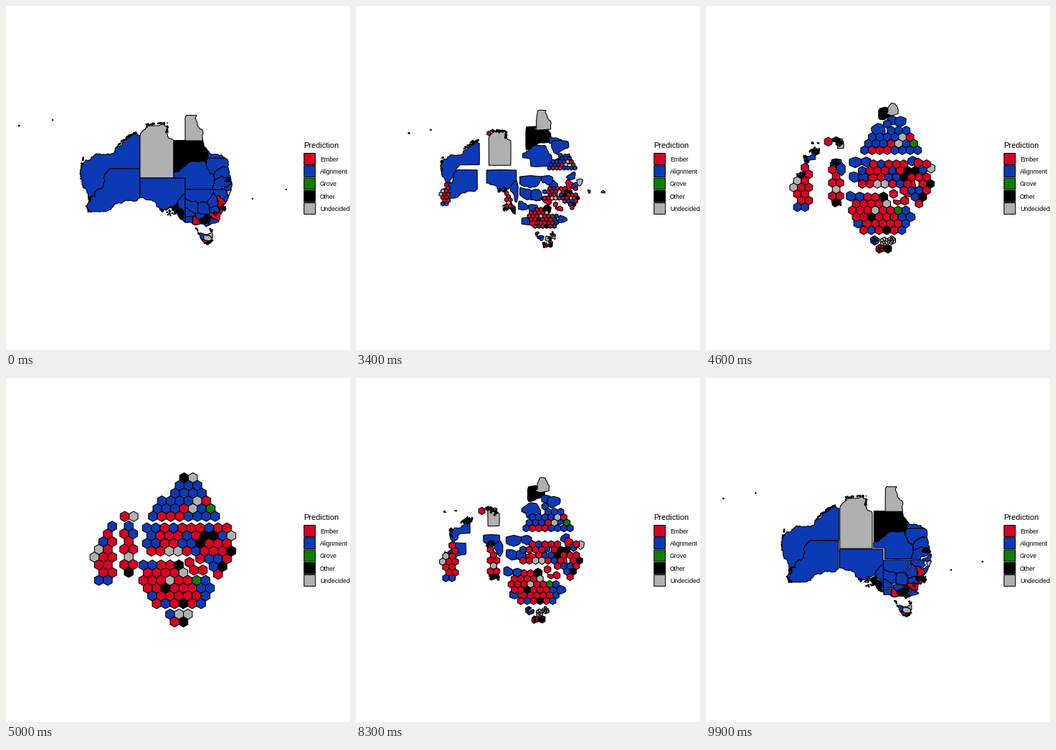
Animation, 480 px wide and 480 px high, one loop 10 s. Source, as a matplotlib script:

```python
import numpy as np
import matplotlib.pyplot as plt
from matplotlib.animation import FuncAnimation
from matplotlib.collections import PolyCollection
from matplotlib.patches import Rectangle

SIZE, DPI = 480, 80
PX = 72 / DPI
FRAMES, STEP = 100, 100
DX, DY, R = 12.4, 10.75, 7.16
LINE, KEY = 1.07, 17.28

COLOURS = {"R": "#da0025", "B": "#0c3ab4", "G": "#127d00",
           "K": "#000000", "U": "#b0b0b0"}
LABELS = ["Ember", "Alignment", "Grove", "Other", "Undecided"]

rng = np.random.default_rng(7)


def hexagon(x, y, r):
    a = np.pi / 6 + np.arange(6) * np.pi / 3
    return np.column_stack([x + r * np.cos(a), y + r * np.sin(a)])


def half(p, d, level):
    """The part of polygon p where p.d <= level."""
    out = []
    for a, b in zip(p, np.roll(p, -1, 0)):
        u, v = a @ d - level, b @ d - level
        if u <= 0:
            out.append(a)
        if u * v < 0:
            out.append(a + (b - a) * u / (u - v))
    return np.array(out)


def cell(outline, seeds, i):
    """The part of the outline that lies nearest to seed i."""
    for j, s in enumerate(seeds):
        if j != i:
            d = s - seeds[i]
            outline = half(outline, d, d @ (s + seeds[i]) / 2)
    return np.round(outline, 1)


def ragged(a, b):
    """Coast-like line from a to b; the same whichever way it is walked."""
    if np.abs(a - b).min() < 0.05:
        return [a]
    lo, hi = sorted([tuple(a), tuple(b)])
    dice = np.random.default_rng([round(v * 10) for v in lo + hi])
    line = [np.array(lo), np.array(hi)]
    while np.hypot(*(line[1] - line[0])) > 1.8:
        finer = []
        for p, q in zip(line, line[1:]):
            d = q - p
            finer += [p, (p + q) / 2 + np.array([-d[1], d[0]])
                      * dice.uniform(-0.2, 0.2)]
        line = finer + [line[-1]]
    return line[:-1] if tuple(a) == lo else line[:0:-1]


def coast(p):
    return np.array([q for a, b in zip(p, np.roll(p, -1, 0))
                     for q in ragged(a, b)])


def area(p):
    q = np.roll(p, -1, 0)
    return np.sum(p[:, 0] * q[:, 1] - q[:, 0] * p[:, 1]) / 2


def lengths(p):
    s = np.hypot(*np.diff(np.vstack([p, p[:1]]), axis=0).T).cumsum()
    return np.concatenate([[0], s / s[-1]])


def along(p, f):
    s, q = lengths(p), np.vstack([p, p[:1]])
    return np.column_stack([np.interp(f % 1, s, q[:, k]) for k in (0, 1)])


def match(a, b):
    """Give both rings the same number of points, starts aligned."""
    a, b = [p if area(p) > 0 else p[::-1] for p in (a, b)]
    f = np.linspace(0, 1, 48, endpoint=False)
    ring, other = [along(p, f) - along(p, f).mean(0) for p in (a, b)]
    k = np.argmin([np.sum((ring - np.roll(other, -i, 0)) ** 2)
                   for i in range(48)])
    cuts = np.sort(np.concatenate([lengths(a)[:-1],
                                   (lengths(b)[:-1] - f[k]) % 1]))
    return along(a, cuts), along(b, cuts + f[k])


def shatter(p, n):
    """Cut a convex polygon into n pieces of about equal area."""
    if n == 1:
        return [p]
    angles = rng.uniform(0, np.pi) + np.arange(6) * np.pi / 6
    dirs = np.column_stack([np.cos(angles), np.sin(angles)])
    d = dirs[np.argmax(np.ptp(p @ dirs.T, axis=0))]
    k, s = n // 2, p @ d
    level = s.min() + np.ptp(s) * k / n
    return shatter(half(p, d, level), k) + shatter(half(p, -d, -level), n - k)


def islets(n, path):
    path = np.array(path, float)
    for _ in range(n):
        i = rng.integers(max(len(path) - 1, 1))
        a, b = path[i], path[min(i + 1, len(path) - 1)]
        x, y = a + (b - a) * rng.random()
        drift = rng.normal(0, 0.7, 2) if len(path) > 1 else 0
        yield hexagon(x, y, rng.uniform(0.4, 1)) + drift


tiles, rural, urban = [], [], []


def region(left, top, art, outline=(), seeds=(), isles=(), city=(0, 0),
           spread=0.08):
    """One character per seat, half a tile per column; a lower-case seat
    takes the land around the next seed, the others crowd the city."""
    seats = [(left + c * DX / 2, top + r * DY, k)
             for r, row in enumerate(art)
             for c, k in enumerate(row) if k != " "]
    outline, seeds = np.array(outline, float), np.array(seeds, float)
    mid = np.mean([s[:2] for s in seats], axis=0)
    n = 0
    for x, y, k in seats:
        tile, colour = hexagon(x, y, R), COLOURS[k.upper()]
        tiles.append((tile, colour))
        if k.islower():
            group, parts = rural, [coast(cell(outline, seeds, n))]
            for owner, count, path in isles:
                if owner == n:
                    parts += islets(count, path)
            n += 1
        else:
            spot = city + spread * (np.array([x, y]) - mid)
            group, parts = urban, [hexagon(*spot, 0.8)]
        pieces = shatter(tile, len(parts))
        for part in parts:
            gaps = [np.hypot(*(q.mean(0) - part.mean(0))) for q in pieces]
            piece = pieces.pop(int(np.argmin(gaps)))
            group.append((*match(part, piece), colour))


# west: north and south
region(148.2, 207, ["b"],
       [(187, 227), (147, 227), (137, 237), (138, 244), (124, 259), (125, 266),
        (115, 267), (113, 258), (106, 245), (104, 236), (106, 220), (117, 215),
        (146, 207), (154, 197), (167, 186), (181, 177), (187, 181)],
       [(150, 215)],
       [(0, 45, [(153, 198), (163, 188), (172, 181), (182, 177)]),
        (0, 14, [(104, 240), (106, 222), (108, 211)])])
region(123.4, 217.75,
       ["   R", "  b R", " U R", "U R R", " R R", "  R R", " B B"],
       [(187, 227), (187, 267), (168, 271), (150, 279), (130, 287), (116, 287),
        (113, 280), (115, 267), (125, 266), (124, 259), (138, 244), (137, 237),
        (147, 227)],
       [(150, 255)], [(0, 12, [(113, 280), (115, 286), (122, 288)])],
       city=(117, 270))

# centre: north and south
region(165.6, 193.2, ["R u"],
       [(187, 181), (187, 240), (234, 240), (234, 188), (223, 177), (227, 169),
        (210, 167), (197, 167), (190, 175)],
       [(210, 205)],
       [(0, 42, [(191, 167), (208, 164), (226, 164), (225, 179)]),
        (0, 2, [(18, 167)]), (0, 1, [(65, 159)])], city=(197, 169))
region(165, 206.6,
       [" b", "R b", " R", "R R", " U", "R R", " k"],
       [(187, 240), (250, 240), (250, 302), (241, 294), (235, 288), (231, 280),
        (224, 285), (216, 283), (207, 273), (200, 271), (187, 267)],
       [(226, 268), (247, 287), (239, 290)],
       [(0, 18, [(214, 283), (222, 289), (230, 286), (229, 279)]),
        (2, 6, [(227, 291), (238, 290)])], city=(236, 288))

# north-east
region(205, 139.3,
       ["       k u",
        "      B b b",
        "     b B B B",
        "  B B B b U R",
        " B B B R U b G",
        "B R R R B B B B"],
       [(250, 256), (250, 240), (234, 240), (234, 188), (250, 188), (250, 155),
        (258, 152.5), (266, 152.5), (267, 164), (274, 183), (276, 195),
        (284, 205), (294, 207), (309, 214), (311, 229), (315, 247), (311, 250),
        (300, 256)],
       [(262, 210), (262, 166), (300, 206), (300, 219), (270, 236), (312, 247),
        (310, 233)], city=(310, 243))

# east, with its enclave
region(196.6, 209.3,
       ["b b R B R R R b r R",
        " B R R R b R K K b u",
        "b b r R b B K R R R",
        " R R U U R B R r R K",
        "            R B B R",
        "               B K",
        "                R"],
       [(250, 256), (300, 256), (311, 250), (315, 247), (314, 258), (306, 275),
        (302, 284), (297, 300), (289, 297), (284, 291), (270, 290), (262, 289),
        (250, 281)],
       [(274, 264), (306, 263), (311, 253), (300, 276), (290, 277), (309, 268),
        (312, 261), (265, 287), (277, 284), (291, 293), (291, 284),
        (304, 281)],
       [(11, 1, [(344, 269)])], city=(302, 282))
region(256, 257.3, ["r", " r r"],
       [(291, 286), (294, 288), (293, 293), (289, 291)],
       [(291, 287), (293, 289), (291, 291)], [(1, 1, [(391, 256)])])

# south-east and the southern island
region(191.6, 261,
       ["b b R R k",
        " R R R R U",
        "R R R U R R G B",
        " R R K R R R b b",
        "  b r R R R R B",
        "   R B R K R B"],
       [(250, 281), (262, 289), (270, 290), (284, 291), (289, 297), (297, 300),
        (289, 303), (279, 308), (272, 304), (266, 305), (250, 302)],
       [(257, 289), (272, 294), (281, 297), (276, 305), (289, 300), (257, 299),
        (265, 300)], city=(275, 300), spread=0.12)
region(229, 329.6, ["b u u", " r k"],
       [(269, 317), (277, 319), (288, 317), (287, 326), (282, 333), (277, 331),
        (272, 325)],
       [(272, 321), (281, 324), (284, 318), (278, 330), (283, 331)],
       [(0, 7, [(266, 310), (269, 317)]), (1, 6, [(288, 320), (287, 329)]),
        (2, 9, [(285, 311), (288, 317)]), (3, 6, [(276, 330), (283, 332)]),
        (4, 5, [(282, 332), (286, 329)])])

parts = rural + urban

fig = plt.figure(figsize=(SIZE / DPI, SIZE / DPI), dpi=DPI, facecolor="white")
ax = fig.add_axes([0, 0, 1, 1])
ax.set(xlim=(0, SIZE), ylim=(SIZE, 0))
ax.axis("off")


def layer(polygons):
    group = PolyCollection([p[0] for p in polygons],
                           facecolors=[p[-1] for p in polygons],
                           edgecolors="black", linewidths=LINE * PX,
                           joinstyle="round")
    ax.add_collection(group, autolim=False)
    return group


land, grid = layer(parts), layer(tiles)

left, top, inset = 415.16, 204.8, 0.71
ax.text(left, 198.3, "Prediction", family="Liberation Sans", size=11 * PX)
for i, (label, colour) in enumerate(zip(LABELS, COLOURS.values())):
    y = top + i * KEY
    ax.add_patch(Rectangle((left + inset, y + inset), KEY - 2 * inset,
                           KEY - 2 * inset, facecolor=colour,
                           edgecolor="black", linewidth=LINE * PX, snap=False))
    ax.text(left + KEY + 5.5, y + 11.9, label, family="Liberation Sans",
            size=8.8 * PX)


def update(i):
    t = np.clip((i - 25) / 25, 0, 1) - np.clip((i - 75) / 25, 0, 1)
    land.set_visible(t < 1)
    grid.set_visible(t >= 1)
    land.set_verts([a + (b - a) * t for a, b, _ in parts])
    return land, grid


anim = FuncAnimation(fig, update, frames=FRAMES, interval=STEP,
                     repeat=True, repeat_delay=0, blit=False)
plt.show()
```
